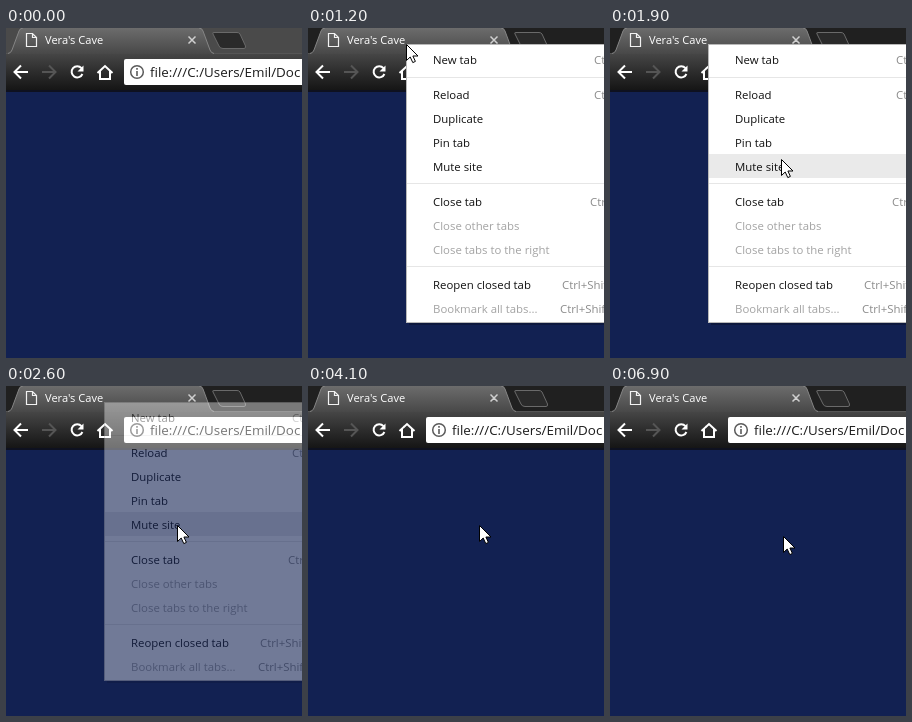
An HTML page for the animation above (7200 ms loop, 296 px wide and 330 px high).

```html
<!DOCTYPE html>
<html lang="en">
<head>
<meta charset="utf-8">
<title>Muting a tab</title>
<style>
  html, body { margin: 0; width: 100%; height: 100%; overflow: hidden; background: #122152; }
  svg { display: block; font: 11.4px "Open Sans", "Noto Sans", sans-serif; }
</style>
</head>
<body>
<svg width="296" height="330" viewBox="0 0 296 330">
  <defs>
    <linearGradient id="tabFill" x2="0" y2="1">
      <stop stop-color="#6c6c6c"/><stop offset="1" stop-color="#484848"/>
    </linearGradient>
    <linearGradient id="barFill" x2="0" y2="1">
      <stop stop-color="#474747"/><stop offset=".55" stop-color="#2a2a2a"/><stop offset="1" stop-color="#141414"/>
    </linearGradient>
  </defs>

  <rect width="296" height="330" fill="#122152"/>
  <rect id="strip" width="296" height="26"/>
  <rect y="25" width="296" height="38" fill="url(#barFill)"/>
  <path d="M0 25.5H296" stroke="#555"/>
  <path d="M0 63H296" stroke="#0e1120" stroke-width="2"/>

  <!-- tab and new-tab button -->
  <path d="M2 26Q5 25 6 22L13 3Q14 0 17 0H193Q196 0 197 3L204 22Q205 25 208 26Z" fill="url(#tabFill)"/>
  <path d="M2 25.5Q5 25 6 22L13 3Q14 0 17 0M193 0Q196 0 197 3L204 22Q205 25 208 25.5" fill="none" stroke="#858585"/>
  <path d="M208 4.5H231Q233 4.5 234 6L239.5 18Q240 20.5 238 20.5H217Q214 20.5 213 18L207 6Q206 4.5 208 4.5Z" fill="#2a2a2a" stroke="#6a6a6a"/>
  <path d="M20.5 5.5H26.5L30.5 9.5V18.5H20.5ZM26.5 5.5V9.5H30.5" fill="none" stroke="#f2f2f2" stroke-width="1.2"/>
  <text x="39" y="16" fill="#fff" font-size="11.1" font-weight="500">Vera's Cave</text>
  <path d="M182.5 8.5L189.5 15.5M189.5 8.5L182.5 15.5" stroke="#d0d0d0" stroke-width="1.5"/>

  <!-- toolbar -->
  <g fill="none" stroke="#fff" stroke-width="2">
    <path d="M22 44H9.5M15 37.5L8.5 44L15 50.5"/>
    <path d="M36 44H49.5M43 37.5L49.5 44L43 50.5" stroke="#555"/>
    <path d="M75.5 40.2A5.6 5.6 0 1 0 76.4 46"/>
    <path d="M77.5 37.5V43.5H71.5Z" fill="#fff" stroke="none"/>
    <path d="M91.5 45L99 38L106.5 45M94 43V51H104V43"/>
  </g>
  <rect x="118" y="31" width="190" height="26" rx="2" fill="#fff"/>
  <circle cx="131" cy="44" r="6.3" fill="none" stroke="#5a5a5a" stroke-width="1.5"/>
  <path d="M131 43V48M131 40V41.7" stroke="#5a5a5a" stroke-width="1.6"/>
  <text x="144" y="49" fill="#1c1c1c" font-size="13.4">file:///C:/Users/Emil/Doc</text>

  <g id="menu">
    <rect x="101" y="19" width="210" height="278" fill="#000" opacity=".25"/>
    <rect x="98.5" y="16.5" width="210" height="278" fill="#fff" stroke="#b8b8b8"/>
    <rect id="hover" x="99" width="200" height="24" fill="#eaeaea"/>
    <path d="M99 49.5H296M99 155.5H296M99 238.5H296" stroke="#e6e6e6"/>
    <g id="items"></g>
  </g>
  <path id="cursor" d="M.5 .5V16.5L4.2 13L6.8 18.6L9.4 17.4L6.9 12H12Z" fill="#fff" stroke="#000"/>
</svg>
<script>
const el = id => document.getElementById(id);
const LOOP = 7200, MENU_IN = 1100, MENU_OUT = 2700;

// label, baseline, shortcut, shortcut x, disabled
const items = [
  ["New tab", 36, "Ctrl+T", 286],
  ["Reload", 71, "Ctrl+R", 286],
  ["Duplicate", 95],
  ["Pin tab", 119],
  ["Mute site", 143],
  ["Close tab", 178, "Ctrl+W", 282],
  ["Close other tabs", 202, "", 0, true],
  ["Close tabs to the right", 226, "", 0, true],
  ["Reopen closed tab", 261, "Ctrl+Shift+T", 254],
  ["Bookmark all tabs...", 285, "Ctrl+Shift+D", 252, true]
];
const label = (x, y, text, fill) => `<text x="${x}" y="${y}" fill="${fill}">${text}</text>`;
el("items").innerHTML = items.map(([name, y, keys, x, off]) =>
  label(125, y, name, off ? "#a3a3a3" : "#111") + (keys ? label(x, y, keys, "#8c8c8c") : "")
).join("");

// time, x, y of the pointer tip
const path = [
  [100, 276, 284], [400, 172, 130], [800, 100, 20], [900, 98, 16], [1200, 98, 16],
  [1600, 150, 98], [1900, 171, 131], [2200, 171, 139], [4200, 171, 139],
  [4300, 176, 147], [4400, 180, 152], [4500, 172, 149], [5800, 172, 149],
  [6000, 173, 150], [LOOP, 173, 150]
];

function pointerAt(t) {
  const i = Math.max(1, path.findIndex(p => p[0] >= t));
  const [t0, x0, y0] = path[i - 1], [t1, x1, y1] = path[i];
  const k = Math.max(0, (t - t0) / (t1 - t0));
  return [Math.round(x0 + (x1 - x0) * k), Math.round(y0 + (y1 - y0) * k)];
}

function draw(now) {
  const t = Math.floor(now % LOOP / 100) * 100;
  const [x, y] = pointerAt(t);
  const open = t >= MENU_IN && t < MENU_OUT;
  el("cursor").setAttribute("transform", `translate(${x} ${y})`);
  el("cursor").style.display = t < 100 ? "none" : "";
  // the window loses focus once the menu opens
  el("strip").setAttribute("fill", t < MENU_IN ? "#4a4a4a" : "#202020");
  el("menu").style.display = open ? "" : "none";
  el("menu").style.opacity = t >= MENU_OUT - 100 ? .4 : 1;
  const row = items.find(([, base, , , off]) => !off && x > 99 && y >= base - 17 && y < base + 7);
  el("hover").style.display = row ? "" : "none";
  if (row) el("hover").setAttribute("y", row[1] - 17);
  requestAnimationFrame(draw);
}
requestAnimationFrame(draw);
</script>
</body>
</html>
```
